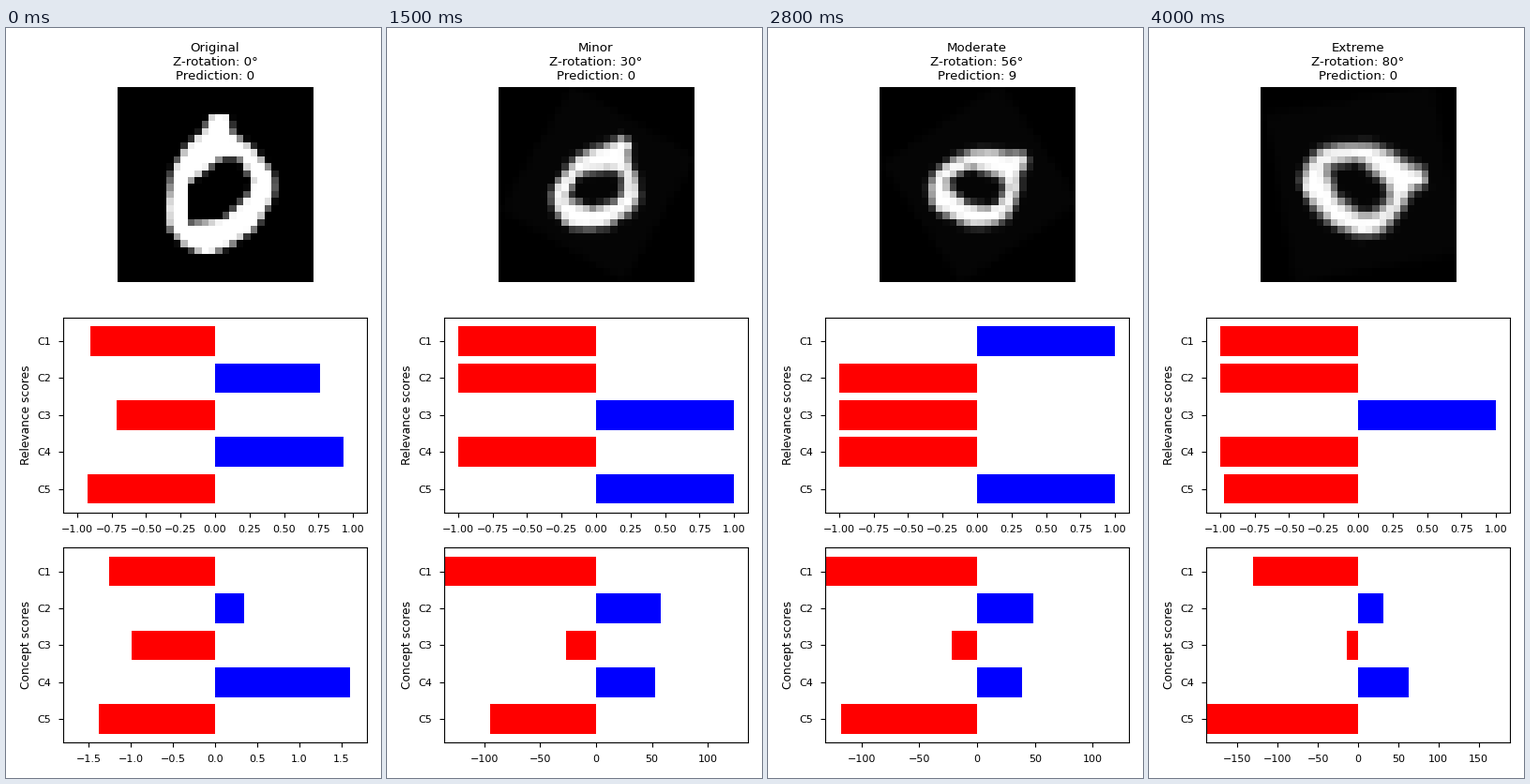
These frames come from a looping animation (400 by 800 pixels, 4.1 s). A matplotlib script:

```python
import numpy as np
import matplotlib.pyplot as plt
from matplotlib.animation import FuncAnimation
from matplotlib.path import Path

W, H, DPI = 400, 800, 100
FRAMES, INTERVAL, STEP = 41, 100, 2
SIZE = 28                              # cells along the digit image
HAZE = 0.02                            # grey of the turned square on black
SIDE, PITCH, TOP = 208.2, 245.6, 63.08  # panel height, spacing, first top
LEFT, WIDE = 61, 324

plt.rcParams.update({
    "font.family": "DejaVu Sans",
    "font.size": 9.6,
    "axes.titlesize": 9.6,
    "axes.labelsize": 8.8,
    "xtick.labelsize": 8,
    "ytick.labelsize": 8,
    "xtick.major.pad": 5.6,
    "ytick.major.pad": 5.6,
})

# Contours of the handwritten zero, in cells
OUTER = [(13.4, 4), (15.9, 4), (16.4, 6.7), (19.3, 8.7), (22.1, 12.2),
         (22.4, 14), (22.2, 16), (19.7, 20.4), (16.4, 22.6), (13.5, 24),
         (12, 24), (9.2, 22.6), (7.2, 20), (7.1, 17), (7.8, 12),
         (9.8, 8.5), (12.2, 6.4)]
HOLE = [(10, 14), (10, 19.7), (15.4, 18.9), (18.8, 15.4), (19.2, 13.4),
        (17.4, 10.2), (15, 10.2)]

# Scores of the unturned digit
FIRST_RELEVANCE = [-0.9, 0.76, -0.715, 0.93, -0.925]
FIRST_SCORES = [-1.255, 0.345, -0.99, 1.6, -1.38]
FIRST_LIMIT = 1.8

# Sign at the start and the two angles where the relevance changes sign
FLIPS = [(-1, 41, 77), (1, 13, 200), (1, 42, 68), (1, 19, 200),
         (-1, 21, 78.42)]


def draw_digit(sub=10):
    """Coverage of the digit in each cell."""
    t = (np.arange(SIZE * sub) + 0.5) / sub
    points = np.stack(np.meshgrid(t, t), axis=-1).reshape(-1, 2)
    inside = Path(OUTER).contains_points(points)
    inside &= ~Path(HOLE).contains_points(points)
    return inside.reshape(SIZE, sub, SIZE, sub).mean(axis=(1, 3))


def bilinear(img, x, y):
    """Sample an image at fractional cells, zero outside."""
    padded = np.pad(img, 2)
    x = np.clip(x + 2, 0, len(img) + 2.99)
    y = np.clip(y + 2, 0, len(img) + 2.99)
    i, j = y.astype(int), x.astype(int)
    v, u = y - i, x - j
    top = padded[i, j] * (1 - u) + padded[i, j + 1] * u
    low = padded[i + 1, j] * (1 - u) + padded[i + 1, j + 1] * u
    return top * (1 - v) + low * v


def rotate(img, degrees):
    """Turn clockwise on an enlarged canvas, then fit back to the grid."""
    if degrees == 0:
        return img
    a = np.radians(degrees)
    c, s = np.cos(a), np.sin(a)
    n = int(SIZE * (c + s))
    t = np.arange(n) - n / 2
    x, y = np.meshgrid(t, t)
    mid = SIZE / 2
    hazy = HAZE + (1 - HAZE) * img
    turned = bilinear(hazy, x * c + y * s + mid, y * c - x * s + mid)
    fit = np.clip((np.arange(SIZE) + 0.5) * n / SIZE - 0.5, 0, n - 1)
    return bilinear(turned, *np.meshgrid(fit, fit))


def relevance(angle):
    if angle == 0:
        return FIRST_RELEVANCE
    return [sign * np.clip(0.0104 * (angle - a) * (angle - b), -1, 1)
            for sign, a, b in FLIPS]


def concept_scores(angle):
    """Five scores and the half-width of their axis."""
    if angle == 0:
        return FIRST_SCORES, FIRST_LIMIT
    wave = np.cos(np.pi * (angle - 38) / 40)
    scores = [
        -133 + 0.1 * angle * np.cos(np.pi * (angle - 48) / 20),
        46 + 15 * wave,
        -21 - 7 * wave,
        38 + 0.0315 * (angle - 52) ** 2,
        -93 - 0.021 * (angle - 22) ** 2 - np.exp((angle - 60) / 6.2),
    ]
    return scores, max(np.abs(scores))


def level(angle):
    if angle == 0:
        return "Original"
    if angle <= 30:
        return "Minor"
    return "Moderate" if angle <= 60 else "Extreme"


def add_panel(row, x, width):
    top = TOP + row * PITCH
    return fig.add_axes([x / W, 1 - (top + SIDE) / H, width / W, SIDE / H])


def bar_panel(row, label):
    ax = add_panel(row, LEFT, WIDE)
    bars = ax.barh(range(5), [1] * 5, height=0.8, linewidth=0)
    ax.set_yticks(range(5), [f"C{k}" for k in range(1, 6)])
    ax.set_ylim(4.64, -0.64)
    ax.set_ylabel(label)
    return ax, bars


def set_bars(bars, values):
    for bar, v in zip(bars, values):
        bar.set_width(v)
        bar.set_facecolor("blue" if v > 0 else "red")


DIGIT = draw_digit()

fig = plt.figure(figsize=(W / DPI, H / DPI), dpi=DPI, facecolor="white")
pic_ax = add_panel(0, LEFT + (WIDE - SIDE) / 2, SIDE)
pic_ax.axis("off")
picture = pic_ax.imshow(DIGIT, cmap="gray", interpolation="nearest")
rel_ax, rel_bars = bar_panel(1, "Relevance scores")
con_ax, con_bars = bar_panel(2, "Concept scores")
rel_ax.set_xlim(-1.1, 1.1)


def update(i):
    angle = i * STEP
    img = rotate(DIGIT, angle)
    picture.set_data(img)
    picture.set_clim(img.min(), img.max())

    rel = relevance(angle)
    set_bars(rel_bars, rel)
    scores, limit = concept_scores(angle)
    set_bars(con_bars, scores)
    con_ax.set_xlim(-limit, limit)

    guess = 9 if rel[0] > 0 else 0
    pic_ax.set_title(f"{level(angle)}\nZ-rotation: {angle}°\n"
                     f"Prediction: {guess}")
    return []


anim = FuncAnimation(fig, update, frames=FRAMES, interval=INTERVAL,
                     init_func=lambda: update(0), repeat=True, repeat_delay=0,
                     blit=False)
plt.show()
```
